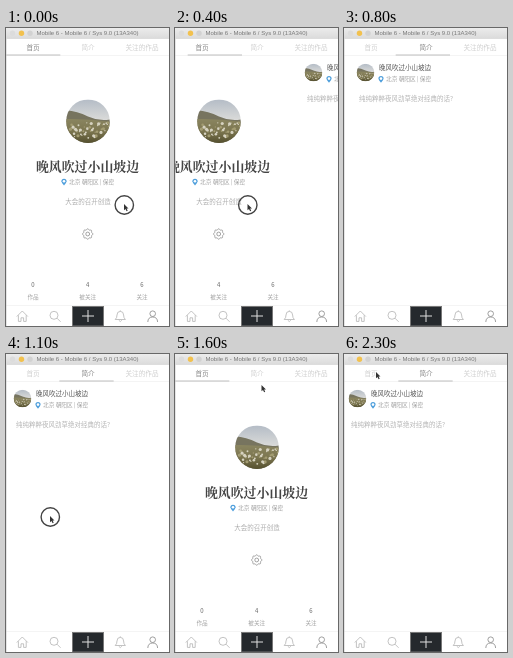
An HTML page with a canvas for the animation above (2.4 s loop, 163 by 298 pixels).

```html
<!DOCTYPE html>
<html lang="zh-CN">
<head>
<meta charset="utf-8">
<title>Profile pager</title>
<style>
html, body { margin: 0; width: 100%; height: 100%; overflow: hidden; background: #fff; }
canvas { display: block; width: 163px; height: 298px; }
</style>
</head>
<body>
<canvas id="stage"></canvas>
<script>
const W = 163, H = 298, LOOP = 2400, STEP = 100;
const SANS = '"Noto Sans CJK SC", "Noto Sans CJK", "Noto Sans", sans-serif';
const SERIF = '"Noto Serif CJK SC", "Noto Serif", "Noto Sans CJK SC", serif';
const NAME = '晚风吹过小山坡边';
const PLACE = '北京 朝阳区 | 保密';

const canvas = document.getElementById('stage');
const ctx = canvas.getContext('2d');
const dpr = window.devicePixelRatio || 1;
canvas.width = Math.round(W * dpr);
canvas.height = Math.round(H * dpr);

// [time, scroll distance]
const scrollKeys = [
  [0, 0], [100, 2], [200, 11], [300, 23], [400, 38], [600, 106], [700, 138],
  [800, 155], [900, 161], [1000, 163], [1100, 160], [1200, 140], [1300, 95],
  [1400, 35], [1500, 8], [1600, 0], [1900, 0], [2000, 110], [2100, 152], [2200, 163]
];
// [time, x, y] of the pointer tip
const pointerKeys = [
  [0, 118, 176], [400, 72.5, 176], [500, 40, 176], [600, -14, 176], [900, -14, 166],
  [1000, 38, 162], [1100, 44, 162], [1300, 110, 162], [1400, 108, 130],
  [1500, 97, 75], [1600, 86.5, 31], [1800, 82, 21], [2000, 82, 21],
  [2100, 70, 20], [2200, 48, 19], [2300, 32, 18]
];

function sample(keys, t, i) {
  let a = keys[0];
  for (const b of keys) {
    if (b[0] >= t) {
      return b === a ? a[i] : a[i] + (b[i] - a[i]) * (t - a[0]) / (b[0] - a[0]);
    }
    a = b;
  }
  return a[i];
}

function text(str, x, y, size, color, align = 'center', weight = 400, family = SANS) {
  ctx.font = `${weight} ${size}px ${family}`;
  ctx.textAlign = align;
  ctx.textBaseline = 'middle';
  ctx.fillStyle = color;
  ctx.fillText(str, x, y);
}

function rect(x, y, w, h, color) {
  ctx.fillStyle = color;
  ctx.fillRect(x, y, w, h);
}

function disc(x, y, r, color) {
  ctx.fillStyle = color;
  ctx.beginPath();
  ctx.arc(x, y, r, 0, 7);
  ctx.fill();
}

function stroke(path, color, width = 0.8) {
  ctx.strokeStyle = color;
  ctx.lineWidth = width;
  ctx.stroke(new Path2D(path));
}

// Round landscape: pale sky, dark slope falling to the right, meadow with blossoms
function avatar(x, y, r) {
  ctx.save();
  ctx.translate(x, y);
  ctx.scale(r, r);
  ctx.beginPath();
  ctx.arc(0, 0, 1, 0, 7);
  ctx.clip();
  const sky = ctx.createLinearGradient(0, -1, 0, 0);
  sky.addColorStop(0, '#b4bcc6');
  sky.addColorStop(1, '#dcdcda');
  rect(-1, -1, 2, 2, sky);
  ctx.fillStyle = '#77745f';
  ctx.fill(new Path2D('M-1 -.5Q-.5 -.45 0 -.22T1 -.08V1H-1Z'));
  const field = ctx.createLinearGradient(0, -0.1, 0, 1);
  field.addColorStop(0, '#8a8560');
  field.addColorStop(0.5, '#7c7650');
  field.addColorStop(1, '#55502f');
  ctx.fillStyle = field;
  ctx.fill(new Path2D('M-1 -.1Q0 -.12 1 .02V1H-1Z'));
  for (let i = 0; i < 50; i++) {
    const px = (i * 0.618 % 1) * 2 - 1;
    const py = 0.05 + (i * i * 0.377 % 1) * 0.75;
    disc(px, py, 0.03 + (i % 4) * 0.014, i % 3 ? '#d6d2c0' : '#a39c72');
  }
  ctx.restore();
}

function place(x, y) {
  ctx.fillStyle = '#4f9fdc';
  ctx.fill(new Path2D(`M${x} ${y + 3.4}Q${x - 2.6} ${y + .5} ${x - 2.6} ${y - .7}A2.6 2.6 0 0 1 ${x + 2.6} ${y - .7}Q${x + 2.6} ${y + .5} ${x} ${y + 3.4}Z`));
  disc(x, y - 0.7, 1.3, '#fff');
  text(PLACE, x + 5, y, 5.7, '#a0a0a0', 'left');
}

function gear(x, y) {
  ctx.beginPath();
  for (let i = 0; i <= 64; i++) {
    const a = i / 64 * Math.PI * 2;
    const r = 4.7 + 0.5 * Math.cos(a * 8);
    ctx.lineTo(x + r * Math.cos(a), y + r * Math.sin(a));
  }
  ctx.strokeStyle = '#8c8c8c';
  ctx.lineWidth = 0.8;
  ctx.stroke();
  ctx.beginPath();
  ctx.arc(x, y, 1.9, 0, 7);
  ctx.stroke();
}

function homePage() {
  avatar(82, 93.2, 21.8);
  text(NAME, 81.5, 138, 12.9, '#444', 'center', 600, SERIF);
  place(58, 154);
  text('大会的召开创造', 82, 173.5, 6.5, '#adadad');
  gear(81.7, 206);
  [['0', '作品', 27], ['4', '被关注', 81.7], ['6', '关注', 136]].forEach(([n, label, x]) => {
    text(n, x, 257, 6, '#666', 'center', 500);
    text(label, x, 269.3, 5.6, '#a0a0a0');
  });
}

function introPage() {
  avatar(13.5, 44.5, 8.8);
  text(NAME, 27, 40, 6.5, '#555', 'left', 500);
  place(29, 51.3);
  text('纯纯粹粹夜风劲草绝对经典的话?', 7, 70.5, 6.5, '#b4b4b4', 'left');
}

function titleBar() {
  const g = ctx.createLinearGradient(0, 0, 0, 11);
  g.addColorStop(0, '#ececec');
  g.addColorStop(1, '#dadada');
  rect(0, 0, W, 10.5, g);
  rect(0, 10.5, W, 0.5, '#ccc');
  disc(6.5, 5.2, 2.7, '#dcdcdc');
  disc(15.5, 5.2, 2.7, '#f2c14e');
  disc(24, 5.2, 2.7, '#d2d2d2');
  text('Mobile 6 - Mobile 6 / Sys 9.0 (13A340)', 81.5, 5.4, 6, '#777', 'center', 400,
    '"Liberation Sans", Arial, sans-serif');
}

function tabs(scroll, active) {
  rect(0, 11, W, 16, '#fff');
  [['首页', 27], ['简介', 82], ['关注的作品', 136]].forEach(([label, x], i) =>
    text(label, x, 19.3, 6.6, i === active ? '#858585' : '#cfcfcf'));
  rect(0, 27, W, 0.5, '#e8e8e8');
  rect(scroll / 3, 26.5, W / 3, 1, '#c0c0c0');
}

function bottomBar() {
  rect(0, 276, W, 22, '#fff');
  rect(0, 277, W, 0.5, '#e8e8e8');
  const soft = '#b4b4b4';
  stroke('M10.8 288.5L16.3 283L21.8 288.5M12.4 287.3V293.4H15V289.8H17.6V293.4H20.2V287.3', soft);
  stroke('M52 287.3A4 4 0 1 1 44 287.3A4 4 0 1 1 52 287.3M51 290.2L54.6 293.8', soft);
  stroke('M109.2 291.5Q111 290 111 287Q111 283.4 114.3 283.4T117.6 287Q117.6 290 119.4 291.5ZM112.8 292.3Q114.3 294.8 115.8 292.3M114.3 283.4V282.4', soft);
  stroke('M149.5 285.7A2.8 2.8 0 1 1 143.9 285.7A2.8 2.8 0 1 1 149.5 285.7M141.8 294Q142 289 146.7 289T151.6 294', '#888');
  rect(66, 278, 32, 20, '#777');
  rect(67, 279, 30, 18.5, '#25292d');
  rect(76, 287.5, 12, 1, '#e0e0e0');
  rect(81.5, 282, 1, 12, '#e0e0e0');
}

function pointer(x, y, pressed) {
  if (pressed) {
    ctx.beginPath();
    ctx.arc(x + 0.3, y + 1, 9.2, 0, 7);
    ctx.strokeStyle = '#444';
    ctx.lineWidth = 1.4;
    ctx.stroke();
  }
  ctx.save();
  ctx.translate(x, y);
  const arrow = new Path2D('M0 0V6.2L1.5 4.9L2.6 7.3L3.7 6.8L2.6 4.5H4.5Z');
  ctx.strokeStyle = '#fff';
  ctx.lineWidth = 0.9;
  ctx.stroke(arrow);
  ctx.fillStyle = '#333';
  ctx.fill(arrow);
  ctx.restore();
}

function draw(t) {
  const scroll = sample(scrollKeys, t, 1);
  const active = (t >= 800 && t < 1500) || t >= 2200 ? 1 : 0;
  const pressed = t < 600 || (t >= 1000 && t <= 1200);
  ctx.setTransform(dpr, 0, 0, dpr, 0, 0);
  rect(0, 0, W, H, '#fff');
  ctx.save();
  ctx.translate(-scroll, 0);
  homePage();
  ctx.translate(W, 0);
  introPage();
  ctx.restore();
  titleBar();
  tabs(scroll, active);
  bottomBar();
  rect(0, 11, 0.5, H - 11, '#ccc');
  pointer(sample(pointerKeys, t, 1), sample(pointerKeys, t, 2), pressed);
}

const start = performance.now();
function tick() {
  const t = (performance.now() - start) % LOOP;
  draw(Math.floor(t / STEP) * STEP);
  requestAnimationFrame(tick);
}
tick();
</script>
</body>
</html>
```
